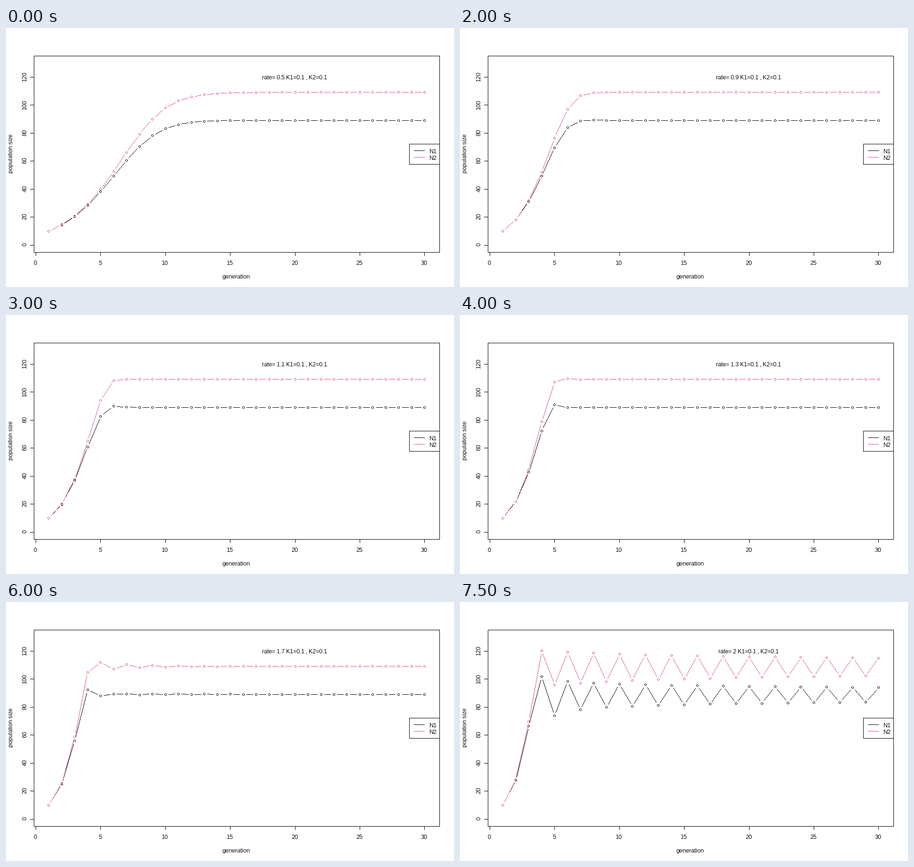
These frames come from a looping animation (950 px wide and 550 px high, 8 s). A matplotlib script:

```python
import numpy as np
import matplotlib.pyplot as plt
from matplotlib.animation import FuncAnimation
from matplotlib.collections import LineCollection
from matplotlib.patches import Rectangle

W, H, DPI = 950, 550, 100
PX = 72 / DPI
BLACK, RED = "#000000", "#DF536B"
LEFT, RIGHT, TOP, BOTTOM = 59.04, 919.76, 59.04, 476.56
LINE = 14.4          # height of one margin line
GAP = 7.2            # space kept clear around each point
GENERATIONS = np.arange(1, 31)

plt.rcParams.update({
    "font.family": "Liberation Sans",
    "font.size": 12 * PX,
    "text.hinting": "native",
    "text.hinting_factor": 1,
})

fig = plt.figure(figsize=(W / DPI, H / DPI), dpi=DPI, facecolor="white")
ax = fig.add_axes([0, 0, 1, 1])
ax.set_xlim(0, W)
ax.set_ylim(H, 0)
ax.axis("off")


def to_x(v):
    return LEFT + (v + 0.16) * (RIGHT - LEFT) / 31.32


def to_y(v):
    return BOTTOM - (v + 5.2) * (BOTTOM - TOP) / 140.4


def strokes(color, z, **style):
    lines = LineCollection([], colors=color, antialiaseds=False, zorder=z, **style)
    lines.set_snap(False)
    ax.add_collection(lines, autolim=False)
    return lines


def straight(segments, color, z):
    """Horizontal and vertical lines on whole pixels."""
    lines = strokes(color, z, linewidths=PX, capstyle="projecting")
    lines.set_segments(np.floor(np.asarray(segments, float)) + 0.5)


def dots(pixels):
    """One short dash inside each pixel."""
    centres = np.asarray(pixels) + 0.5
    return np.stack([centres - (0.4, 0), centres + (0.4, 0)], axis=1)


def label(x, y, text, ha="center"):
    # shifts make glyphs land on the floored pen position
    dx = -1 if ha == "center" else -0.5
    return ax.text(x + dx, y, text, ha=ha, va="baseline", color=BLACK, zorder=5)


def side_label(x, y, text):
    return ax.text(x + 0.4, y - 1.5, text, rotation=90, ha="center", va="baseline",
                   rotation_mode="anchor", color=BLACK, zorder=5)


def box(x0, y0, x1, y1):
    return [[(x0, y0), (x1, y0)], [(x1, y0), (x1, y1)],
            [(x1, y1), (x0, y1)], [(x0, y1), (x0, y0)]]


def draw_axes():
    segments = box(LEFT, TOP, RIGHT, BOTTOM)
    for v in range(0, 31, 5):
        x = to_x(v)
        segments.append([(x, BOTTOM), (x, BOTTOM + LINE / 2)])
        label(x, 503, str(v))
    for v in range(0, 121, 20):
        y = to_y(v)
        segments.append([(LEFT, y), (LEFT - LINE / 2, y)])
        side_label(43, y, str(v))
    straight(segments, BLACK, 1)
    label((LEFT + RIGHT) / 2, 532, "generation")
    side_label(14, (TOP + BOTTOM) / 2, "population size")


def draw_legend():
    top = (TOP + BOTTOM) / 2 - 1.5 * LINE
    ax.add_patch(Rectangle((855.5, top), 64, 3 * LINE, fc="white", ec="none", zorder=3))
    straight(box(855, top, RIGHT, top + 3 * LINE), BLACK, 4)
    for row, (name, color) in enumerate([("N1", BLACK), ("N2", RED)]):
        y = 260 + 14 * row
        straight([[(865, y), (887, y)]], color, 4)
        label(898, y + 6, name, ha="left")


def simulate(rate):
    n1, n2 = [10.0], [10.0]
    for _ in GENERATIONS[1:]:
        a, b = n1[-1], n2[-1]
        n1.append(a + rate * a * (1 - (a + 0.1 * b) / 100))
        n2.append(b + rate * b * (1 - (b + 0.1 * b) / 120))
    return np.array(n1), np.array(n2)


def line_pixels(start, end):
    """One pixel per step along the longer direction."""
    a, b = np.floor(start), np.floor(end)
    steps = int(np.abs(b - a).max())
    return np.ceil(np.linspace(a, b, steps + 1).round(6) - 0.5)


RING = np.array([(i, j) for i in range(-2, 3) for j in range(-2, 3)
                 if max(abs(i), abs(j)) == 2 and abs(i) != abs(j)])


def curve(values):
    pts = np.column_stack([to_x(GENERATIONS), to_y(values)])
    step = np.diff(pts, axis=0)
    trim = step * GAP / np.hypot(step[:, 0], step[:, 1])[:, None]
    pixels = [line_pixels(p, q) for p, q in zip(pts[:-1] + trim, pts[1:] - trim)]
    pixels += [np.floor(p) + RING for p in pts]
    return dots(np.concatenate(pixels))


draw_axes()
draw_legend()
curves = [strokes(color, z, linewidths=0.8 * PX, capstyle="butt")
          for color, z in [(BLACK, 2), (RED, 2.5)]]
note = label(to_x(20), 109, "")


def update(i):
    rate = 0.5 + 0.1 * i
    for lines, values in zip(curves, simulate(rate)):
        lines.set_segments(curve(values))
    note.set_text(f"rate= {rate:g} K1=0.1 , K2=0.1")
    return [*curves, note]


anim = FuncAnimation(fig, update, frames=16, interval=500, repeat=True,
                     repeat_delay=0, blit=False)
plt.show()
```
